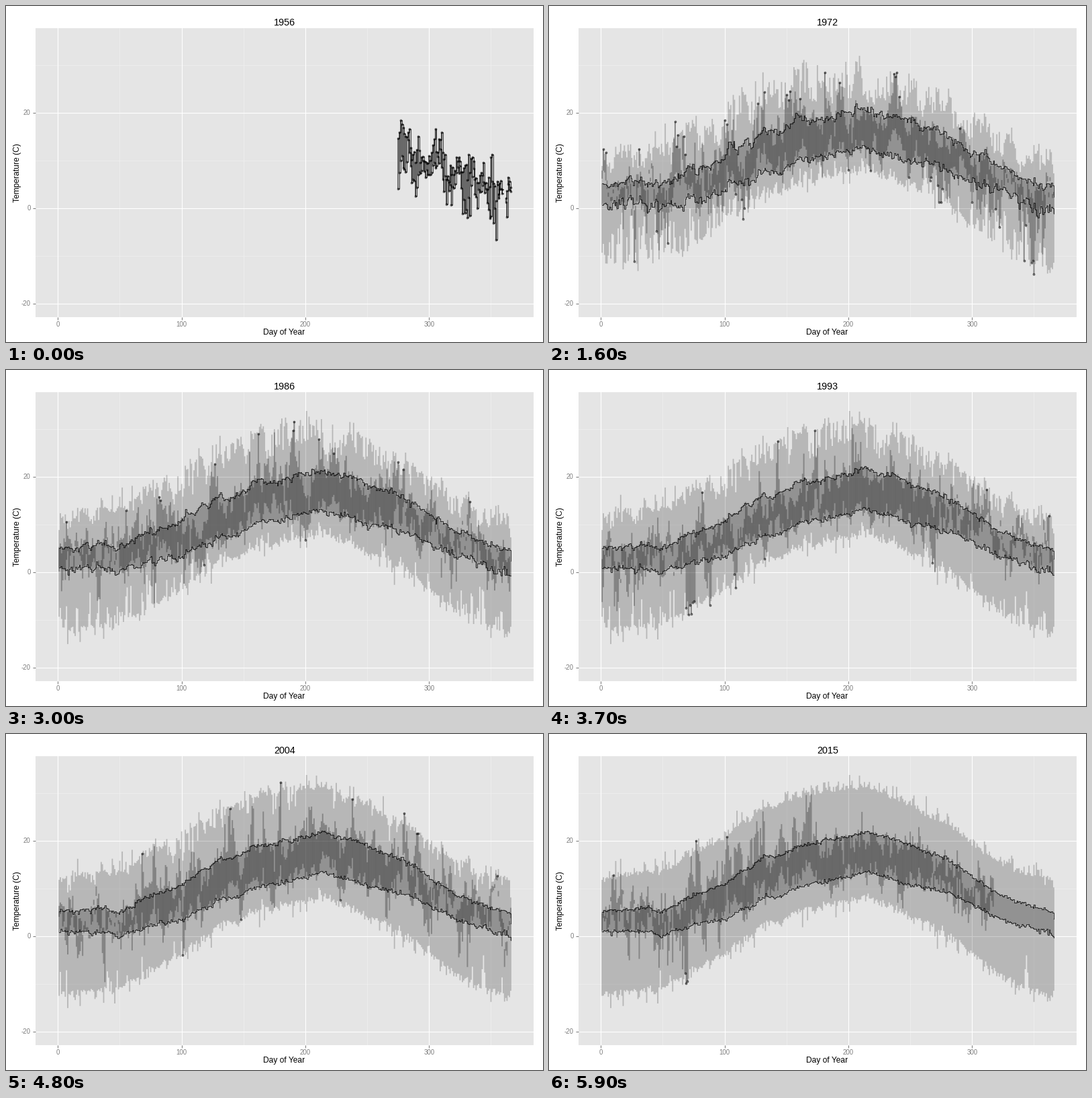
A matplotlib script for the animation above (6 s loop, 800x500 px).

```python
import matplotlib.pyplot as plt
import numpy as np
from matplotlib.animation import FuncAnimation

plt.rcParams["font.family"] = "Liberation Sans"
W, H, DPI = 800, 500, 100
FIRST, LAST, NDAYS = 1956, 2015, 366
LEFT, RIGHT, TOP, BOTTOM = 43.5, 786, 33.3, 463   # panel, in pixels
X0, DX, Y0, DY = 77.3, 1.8433, 300.8, 7.11        # origin and pixels per unit
days = np.arange(1, NDAYS + 1)
years = np.arange(FIRST, LAST + 1)
rng = np.random.default_rng(12)

# Long-term mean high as (day, temperature)
MEAN_HI = [(1, 5.3), (38, 5.9), (48, 5), (75, 8.7), (100, 11), (115, 14), (120, 14.1),
           (132, 17), (140, 16.4), (160, 18.9), (200, 20.9), (214, 22), (240, 20),
           (280, 16), (320, 9), (340, 6.8), (366, 5)]


def season(peak):
    """Yearly wave from 0 to 1, highest on the given day."""
    return (1 + np.cos(2 * np.pi * (days - peak) / 365)) / 2


def red_noise(phi=0.72):
    z = rng.normal(size=(len(years), NDAYS))
    for d in range(1, NDAYS):
        z[:, d] = phi * z[:, d - 1] + np.sqrt(1 - phi * phi) * z[:, d]
    return z


def spread(z, skew, reach):
    """Skewed departures with zero mean and a fixed largest value per day."""
    a = np.expm1(skew * z) / skew
    a -= a.mean(axis=0)
    return a * reach / a.max(axis=0)


def make_weather():
    daily_range = 4.2 + 4.2 * np.minimum(1, 1.35 * season(184.5))
    mean_hi = np.interp(days, *zip(*MEAN_HI))
    mean_lo = mean_hi - daily_range + rng.normal(0, 0.22, NDAYS)
    mean_hi = mean_hi + rng.normal(0, 0.22, NDAYS)
    reach_hi = 6.3 + 3.8 * season(155) + rng.exponential(0.8, NDAYS)
    reach_lo = 4.6 + 8.3 * season(0) ** 1.5 + rng.exponential(0.8, NDAYS)

    trend = np.linspace(-0.25, 0.25, len(years))[:, None]
    z_hi = red_noise()
    z_lo = 0.75 * z_hi + 0.66 * red_noise()
    summer = season(202)
    hi = mean_hi + spread(z_hi + trend, 0.05 + 0.3 * summer, reach_hi)
    lo = mean_lo - spread(-z_lo - trend, 0.35 - 0.3 * summer, reach_lo)
    lo = np.minimum(lo, hi - 0.8)

    # Leap days, a start in autumn with a short gap, and an unfinished last year
    missing = np.zeros(hi.shape, bool)
    missing[years % 4 != 0, -1] = True
    missing[0, :274] = missing[0, 359:361] = True
    missing[-1, 317:] = True
    hi[missing] = lo[missing] = np.nan
    return hi, lo


def running_mean(temps):
    count = np.cumsum(~np.isnan(temps), axis=0)
    return np.nancumsum(temps, axis=0) / np.where(count, count, np.nan)


hi, lo = make_weather()
avg_hi, avg_lo = running_mean(hi), running_mean(lo)
rec_hi, rec_lo = np.fmax.accumulate(hi), np.fmin.accumulate(lo)


def pt(px):
    return px * 72 / DPI


def label(x, y, s, size, **kw):
    kw = {"ha": "center", "va": "baseline", **kw}
    return fig.text(x / W, 1 - y / H, s, fontsize=pt(size), **kw)


fig = plt.figure(figsize=(W / DPI, H / DPI), dpi=DPI, facecolor="white")
ax = fig.add_axes([LEFT / W, 1 - BOTTOM / H, (RIGHT - LEFT) / W, (BOTTOM - TOP) / H],
                  facecolor="#e5e5e5")
for side in ax.spines.values():
    side.set_visible(False)

for v in range(50, 351, 100):
    ax.axvline(v, color="#f2f2f2", lw=pt(0.6), zorder=0)
for v in range(-10, 31, 20):
    ax.axhline(v, color="#f2f2f2", lw=pt(0.6), zorder=0)
for v in range(0, 301, 100):
    ax.axvline(v, color="white", lw=pt(1.1), zorder=0)
    label(X0 + v * DX, 477, str(v), 9.6, color="#7f7f7f")
for v in range(-20, 21, 20):
    ax.axhline(v, color="white", lw=pt(1.1), zorder=0)
    label(36.5, Y0 - v * DY + 3.5, str(v), 9.6, color="#7f7f7f", ha="right")
label(414.5, 489, "Day of Year", 12)
label(20, 248, "Temperature (C)", 12, rotation=90, rotation_mode="anchor")
title = label(415, 29, "", 14.4)

edges = np.arange(0.5, NDAYS + 1)
flat = np.zeros(NDAYS)


def band(z):
    return ax.stairs(flat, edges, baseline=flat, fill=True, color="black",
                     alpha=0.2, lw=0, zorder=z)


record, normal = band(1), band(2)
bars = ax.vlines(days, flat, flat, color="black", alpha=0.27, lw=pt(1.95), zorder=3)
bars.set_snap(False)
steps = [ax.plot(days, flat, color="black", alpha=0.72, lw=pt(1.07),
                 drawstyle="steps-post", zorder=4)[0] for _ in range(2)]
dots, = ax.plot([], [], "o", ms=pt(2.9), mfc=(0, 0, 0, 0.4), mec=(0, 0, 0, 0.6),
                mew=pt(0.8), zorder=5)

ax.set_xlim((LEFT - X0) / DX, (RIGHT - X0) / DX)
ax.set_ylim((Y0 - BOTTOM) / DY, (Y0 - TOP) / DY)
ax.set_xticks(range(0, 301, 100), [""] * 4)
ax.set_yticks(range(-20, 21, 20), [""] * 3)
ax.tick_params(length=pt(4.2), width=pt(1.1), color="#7f7f7f")


def draw(i):
    title.set_text(str(years[i]))
    record.set_data(values=rec_hi[i], baseline=rec_lo[i])
    normal.set_data(values=avg_hi[i], baseline=avg_lo[i])
    ok = ~np.isnan(hi[i])
    bars.set_segments([[(d, a), (d, b)]
                       for d, a, b in zip(days[ok], lo[i][ok], hi[i][ok])])
    steps[0].set_ydata(avg_hi[i])
    steps[1].set_ydata(avg_lo[i])
    # A dot marks each day that beats every earlier year
    new_hi, new_lo = ok.copy(), ok.copy()
    if i:
        new_hi &= ~(hi[i] <= rec_hi[i - 1])
        new_lo &= ~(lo[i] >= rec_lo[i - 1])
    dots.set_data(np.r_[days[new_hi], days[new_lo]],
                  np.r_[hi[i][new_hi], lo[i][new_lo]])
    return [title, record, normal, bars, *steps, dots]


anim = FuncAnimation(fig, draw, frames=len(years), interval=100, repeat=True,
                     repeat_delay=0)
plt.show()
```
